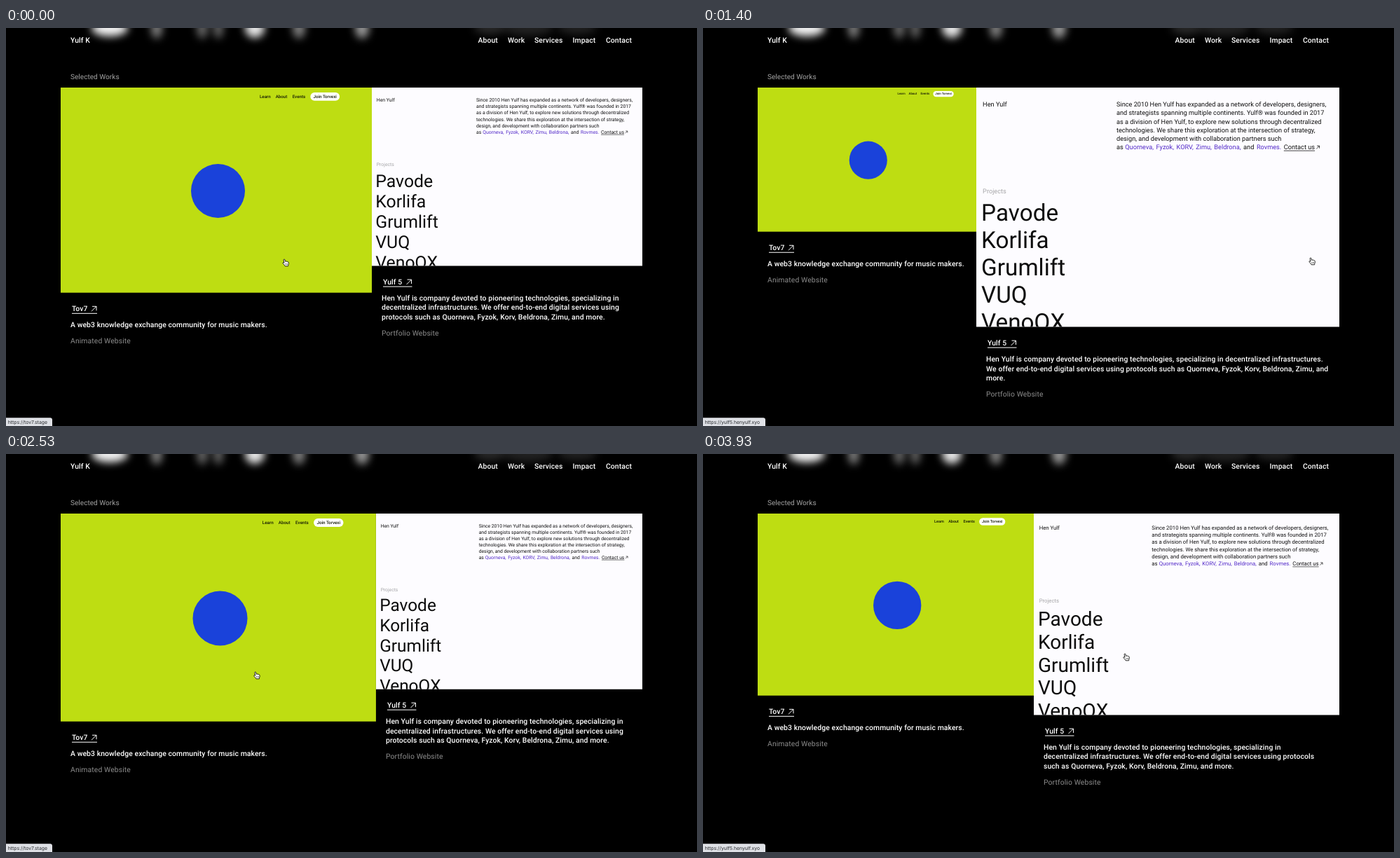
An HTML page for the animation above (4 s loop, 986 px wide and 568 px high).

```html
<!DOCTYPE html>
<html lang="en">
<head>
<meta charset="utf-8">
<title>Selected Works</title>
<style>
  html, body { margin: 0; width: 100%; height: 100%; overflow: hidden; background: #000; }
  svg { display: block; }
  text { font: 500 10.4px Roboto, Arial, sans-serif; letter-spacing: .08px; fill: #fff;
         text-rendering: geometricPrecision; white-space: pre; }
  .grey { font-weight: 400; letter-spacing: .1px; fill: #8c8c8c; }
  .head { font-weight: 400; font-size: 10.1px; letter-spacing: 0; fill: #a2a2a2; }
  .menu { font-size: 6.2px; letter-spacing: 0; fill: #141a05; }
  .small { font-weight: 400; font-size: 6.85px; letter-spacing: 0; fill: #101010; }
  .faint { fill: #a6a6a8; }
  .chain { fill: #5128c8; word-spacing: .9px; }
  .big { font-weight: 400; font-size: 24.8px; letter-spacing: 0; fill: #0c0c0c; }
  .status { font: 6.85px Inter, Arial, sans-serif; letter-spacing: 0; fill: #26282c; }
  .line { fill: none; stroke: #fff; stroke-width: 1; }
</style>
</head>
<body>
<svg id="stage" width="986" height="568" viewBox="0 0 986 568">
  <defs>
    <filter id="soft" x="-50%" y="-100%" width="200%" height="300%"><feGaussianBlur stdDeviation="6"/></filter>
  </defs>
  <rect width="986" height="568"/>
</svg>
<script>
const LOOP = 4000, FRAMES = 60;
const LEFT = 78, RIGHT = 908, TOP = 85, RATIO = 0.6595;
const stage = document.getElementById("stage");

function add(parent, tag, attrs = {}, content = "") {
  const el = document.createElementNS("http://www.w3.org/2000/svg", tag);
  set(el, attrs);
  el.textContent = content;
  parent.appendChild(el);
  return el;
}
function set(el, attrs) {
  for (const k in attrs) el.setAttribute(k, attrs[k]);
}
const label = (parent, x, y, str, cls = "") => add(parent, "text", { x, y, class: cls }, str);

// Blurred headline above the fold: centre, half width, half height, opacity
const glow = add(stage, "g", { fill: "#fff", filter: "url(#soft)" });
[[148, 26, 12, .95], [215, 8, 15, .5], [280, 8, 15, .4], [303, 7, 15, .4], [355, 14, 14, .9],
 [418, 9, 15, .5], [508, 10, 15, .6], [690, 22, 9, .16], [745, 36, 11, .13], [815, 28, 9, .13]]
  .forEach(([cx, rx, ry, opacity]) => add(glow, "ellipse", { cx, cy: 0, rx, ry, opacity }));

label(stage, 92, 21.2, "Yulf K");
[["About", 673.5], ["Work", 716], ["Services", 754], ["Impact", 808.5], ["Contact", 856]]
  .forEach(([str, x]) => label(stage, x, 21.2, str));
label(stage, 92, 72.6, "Selected Works", "head");

// Left card, drawn at a width of 444
const lime = add(stage, "svg", { x: LEFT, y: TOP, viewBox: "0 0 444 292.8", preserveAspectRatio: "none" });
add(lime, "rect", { width: 444, height: 293, fill: "#bedd12" });
[["Learn", 284], ["About", 306.7], ["Events", 330.7]].forEach(([str, x]) => label(lime, x, 14.9, str, "menu"));
add(lime, "rect", { x: 356.3, y: 7, width: 41.8, height: 11.8, rx: 5.9, fill: "#fff" });
set(label(lime, 377.2, 14.9, "Join Torvexi", "menu"), { "text-anchor": "middle" });
add(lime, "circle", { cx: 224.5, cy: 147.5, r: 38.5, fill: "#1a42da" });

// Right card, drawn at a width of 386
const white = add(stage, "svg", { y: TOP, viewBox: "0 0 386 254.6", preserveAspectRatio: "none" });
add(white, "rect", { width: 386, height: 255, fill: "#fdfcff" });
label(white, 6.8, 20.4, "Hen Yulf", "small");
["Since 2010 Hen Yulf has expanded as a network of developers, designers,",
 "and strategists spanning multiple continents. Yulf® was founded in 2017",
 "as a division of Hen Yulf, to explore new solutions through decentralized",
 "technologies. We share this exploration at the intersection of strategy,",
 "design, and development with collaboration partners such",
 "as"].forEach((str, i) => label(white, 149, 20.4 + i * 9.05, str, "small"));
const lastLine = 20.4 + 5 * 9.05;
label(white, 158.2, lastLine, "Quorneva, Fyzok, KORV, Zimu, Beldrona,", "small chain");
label(white, 284, lastLine, "and", "small");
label(white, 298, lastLine, "Rovmes.", "small chain");
label(white, 327, lastLine, "Contact us", "small");
add(white, "path", { d: "M327 67.2h33M361.6 65.2l3.2-3.2M362.2 62h2.6v2.6", fill: "none", stroke: "#141414", "stroke-width": .6 });
label(white, 6.8, 112.5, "Projects", "small faint");
["Pavode", "Korlifa", "Grumlift", "VUQ", "VenoQX"]
  .forEach((str, i) => label(white, 5.3, 141.7 + i * 29, str, "big"));

function link(parent, x, str, width) {
  const g = add(parent, "g", { transform: `translate(${x} 26.5)` });
  label(g, 0, 0, str);
  add(g, "path", { class: "line", d: `M0 3h${width}M${width - 8} 0l7-7M${width - 7}-7h6v6` });
}

const capLeft = add(stage, "g");
link(capLeft, 94, "Tov7", 36);
label(capLeft, 92, 48.8, "A web3 knowledge exchange community for music makers.");
label(capLeft, 92, 71.8, "Animated Website", "grey");

const capRight = add(stage, "g");
const FIRST = 49, LEADING = 13.9;
link(capRight, 16, "Yulf 5", 41.5);
const about = Array.from({ length: 5 }, (_, i) => label(capRight, 14, FIRST + i * LEADING, ""));
const kind = label(capRight, 14, 0, "Portfolio Website", "grey");

// Phrases with the place where each ends when set on a single line
const phrases = [
  ["Hen Yulf is company devoted to pioneering technologies, ", 271], ["specializing ", 331], ["in ", 342],
  ["decentralized ", 410], ["infrastructures. ", 485], ["We ", 505], ["offer ", 534], ["end-to-", 568],
  ["end ", 587], ["digital ", 620], ["services ", 662], ["using ", 690], ["protocols ", 737], ["such ", 764],
  ["as ", 780], ["Quorneva, ", 827], ["Fyzok, ", 858], ["Korv, ", 886], ["Beldrona, ", 935], ["Zimu, ", 958],
  ["and ", 978], ["more.", 1008]];

function wrap(width) {
  const lines = [""];
  let start = 0, next = 0;
  for (const [str, end] of phrases) {
    if (end - start > width) {
      lines.push("");
      start = next;
    }
    lines[lines.length - 1] += str;
    next = end + (str.endsWith(" ") ? 3 : 0);
  }
  return lines;
}

const bar = add(stage, "path", { fill: "#dfe1e6" });
const url = label(stage, 2.8, 564.6, "", "status");

const hand = add(stage, "g", { stroke: "#111", "stroke-width": .9, "stroke-linejoin": "round" });
add(hand, "path", { fill: "#fff", d: "M-2.9-3.8q0-1.2 .9-1.2q.8 0 1 1l.5 2.2q1.8-.5 3 .2q1.6.2 1.8 1.8q.3 1.7-.6 3.2v1.4h-4.6q-.4-1.4-2.6-3.3q-1-1-.3-1.7q.7-.5 1.8.5z" });
add(hand, "path", { fill: "none", "stroke-width": .5, d: "M-.3 1v2M1.2 1v2M2.6 1v2" });

// time, pointer x, pointer y, divider x
const steps = [
  [0, 399, 335, 522], [533, 712, 336, 443], [1050, 862, 335, 393], [1400, 869, 333, 390],
  [1700, 863, 329, 391], [2267, 575, 317, 465], [2867, 168, 315, 585], [3220, 169, 311, 585],
  [3600, 289, 302, 556], [3933, 604, 290, 472]];

// Smooth curve through one column, without overshoot
function curve(col) {
  const slope = steps.slice(1).map((s, i) => (s[col] - steps[i][col]) / (s[0] - steps[i][0]));
  const tangent = steps.map((_, i) => {
    const a = slope[i - 1] ?? slope[i], b = slope[i] ?? a;
    return a * b > 0 ? 2 * a * b / (a + b) : 0;
  });
  return t => {
    let i = 0;
    while (i < steps.length - 2 && t >= steps[i + 1][0]) i++;
    const h = steps[i + 1][0] - steps[i][0];
    const u = Math.min(1, (t - steps[i][0]) / h), v = 1 - u;
    return steps[i][col] * v * v * (1 + 2 * u) + steps[i + 1][col] * u * u * (3 - 2 * u)
      + h * u * v * (tangent[i] * v - tangent[i + 1] * u);
  };
}
const [pointerX, pointerY, divider] = [1, 2, 3].map(curve);

function draw(t) {
  const x = pointerX(t), split = divider(t);
  const wl = split - LEFT, wr = RIGHT - split;
  set(lime, { width: wl, height: wl * RATIO });
  set(white, { x: split, width: wr, height: wr * RATIO });
  set(capLeft, { transform: `translate(0 ${TOP + wl * RATIO})` });
  set(capRight, { transform: `translate(${split} ${TOP + wr * RATIO})` });

  const lines = wrap(wr - 27.3);
  about.forEach((el, i) => el.textContent = lines[i] || "");
  kind.setAttribute("y", FIRST + (lines.length - 1) * LEADING + 22.9);

  const onRight = x > split;
  url.textContent = onRight ? "https://yulf5.henyulf.xyo" : "https://tov7.stage";
  set(bar, { d: `M0 556.2h${onRight ? 86 : 63}q3 0 3 3v9H0z` });
  set(hand, { transform: `translate(${x} ${pointerY(t)})` });
}

const begin = performance.now();
function tick() {
  const t = (performance.now() - begin) % LOOP;
  const n = Math.min(FRAMES - 1, Math.floor((t + 4) * FRAMES / LOOP));
  draw(n * LOOP / FRAMES);
  requestAnimationFrame(tick);
}
tick();
</script>
</body>
</html>
```
